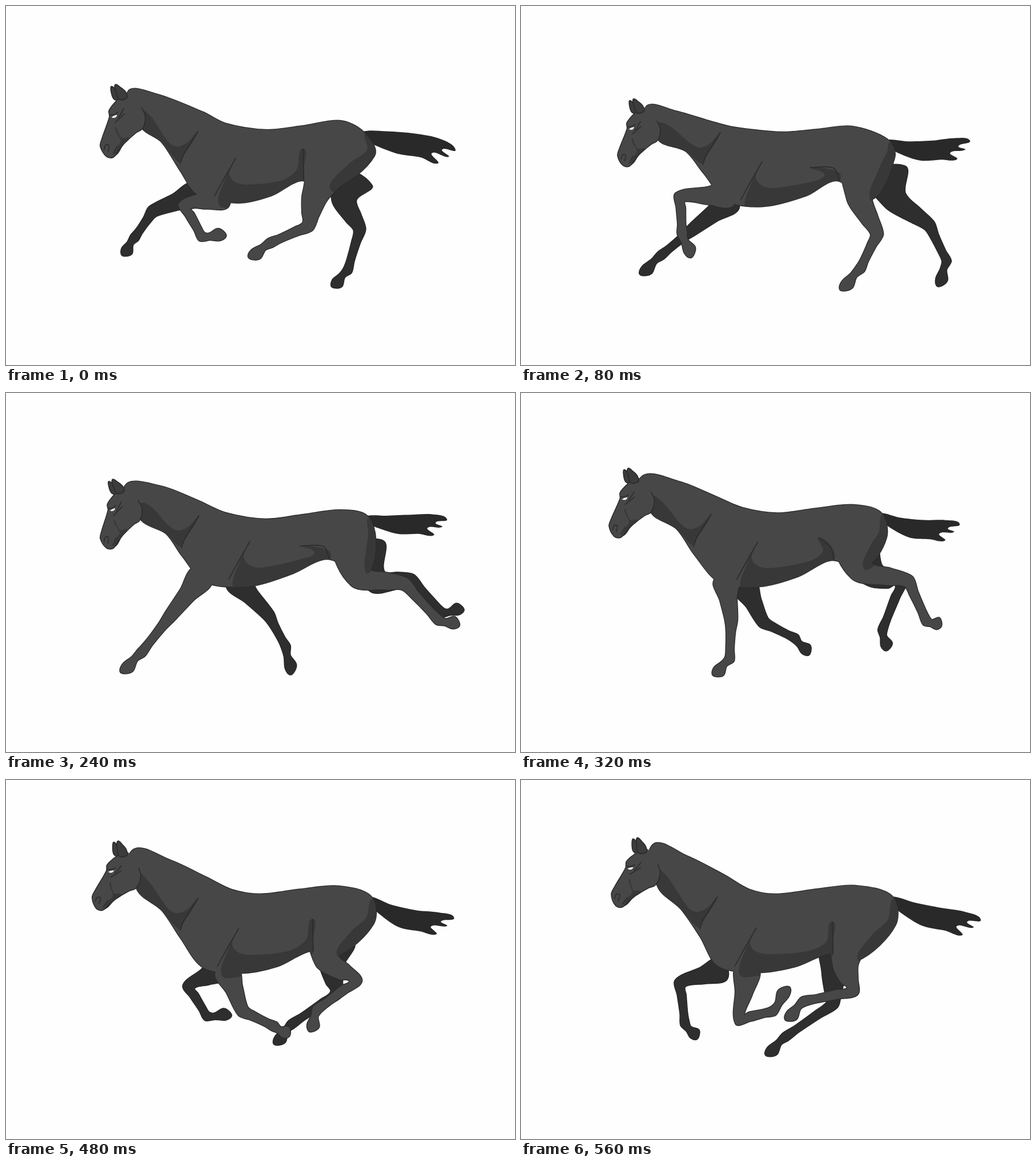
An HTML page for the animation above (640 ms loop, 891x629 px).

```html
<!DOCTYPE html>
<html lang="en">
<head>
<meta charset="utf-8">
<title>Galloping horse</title>
<style>
  html, body { margin: 0; width: 100%; height: 100%; overflow: hidden; background: #fefefe; }
  svg { display: block; width: 891px; height: 629px; }
  path { stroke-linejoin: round; stroke-linecap: round; }
  .pose { visibility: hidden; animation: show 640ms step-end infinite; }
  @keyframes show { 0% { visibility: visible; } 12.5%, 100% { visibility: hidden; } }
  .far { fill: #2e2e2e; stroke: #272727; stroke-width: 1.4; }
  .tail { fill: #292929; }
  .rim { fill: #2b2b2b; stroke: #2b2b2b; stroke-width: 2.6; }
  .coat { fill: #474747; }
  .shade { fill: #383838; }
  .line { fill: none; stroke: #2b2b2b; stroke-width: 1.6; }
  .ear { fill: #3c3c3c; stroke: #2b2b2b; stroke-width: 1.8; }
  .eye { fill: #fff; }
</style>
</head>
<body>
<svg id="stage" viewBox="0 0 891 629"></svg>
<script>
const stage = document.getElementById('stage');

const points = text => text.split(' ').map(pair => pair.split(',').map(Number));
const lerp = (a, b, t) => a.map((v, i) => v + (b[i] - v) * t);
const plus = ([x, y], dx, dy) => [x + dx, y + dy];
const unit = (a, b) => {
  const x = b[0] - a[0], y = b[1] - a[1], length = Math.hypot(x, y) || 1;
  return [x / length, y / length];
};

// Smooth path through points; tangents follow the neighbours, scaled to each segment.
function curve(p, closed = true) {
  const n = p.length;
  const at = i => closed ? p[(i + n) % n] : p[Math.max(0, Math.min(n - 1, i))];
  const tangent = i => unit(at(i - 1), at(i + 1));
  let d = `M${p[0]}`;
  for (let i = 0; i < n - (closed ? 0 : 1); i++) {
    const a = at(i), b = at(i + 1), u = tangent(i), v = tangent(i + 1);
    const k = .3 * Math.hypot(b[0] - a[0], b[1] - a[1]);
    d += `C${plus(a, u[0] * k, u[1] * k)} ${plus(b, -v[0] * k, -v[1] * k)} ${b}`;
  }
  return d;
}

function add(parent, tag, attributes) {
  const node = document.createElementNS('http://www.w3.org/2000/svg', tag);
  for (const name in attributes) node.setAttribute(name, attributes[name]);
  return parent.appendChild(node);
}

const draw = (parent, style, d) => add(parent, 'path', { class: style, d });

// Joints run from the body down to fetlock and toe; a hind leg has one joint more.
function leg(text) {
  const joints = points(text), hind = joints.length > 4;
  const toe = joints.pop(), fetlock = joints.pop(), knee = joints.pop(), top = joints[0];
  const bone = hind
    ? [[top, 34], [joints[1], 22], [lerp(joints[1], knee, .6), 15]]
    : [[top, 20], [lerp(top, knee, .5), 15]];
  bone.push([knee, 11], [lerp(knee, fetlock, .3), 8], [lerp(knee, fetlock, .75), 7], [fetlock, 8.5]);
  const front = [], back = [];
  bone.forEach(([p, width], i) => {
    const before = unit(bone[Math.max(i - 1, 0)][0], bone[Math.max(i, 1)][0]);
    const after = unit(p, i < bone.length - 1 ? bone[i + 1][0] : toe);
    const [x, y] = unit([0, 0], plus(before, ...after));
    front.push(plus(p, -y * width, x * width));
    back.unshift(plus(p, y * width, -x * width));
  });
  const [x, y] = unit(fetlock, toe);
  const hoof = (t, side) => plus(lerp(fetlock, toe, t), y * side, -x * side);
  return curve([...front, hoof(.35, -6), hoof(.75, -7), toe, hoof(.9, 9), hoof(.65, 14), hoof(.3, 6), ...back]);
}

const tailShape = points('0,-3 25,-9 55,-12 82,-10 100,0 86,1 94,8 76,6 84,16 65,12 40,12 15,8 0,4');

function tail(dock, [tipX, tipY, bend]) {
  const x = (tipX - dock[0]) / 100, y = (tipY - dock[1]) / 100;
  return curve(tailShape.map(([along, across]) => {
    const side = across + bend * along * (100 - along) / 2500;
    return plus(dock, x * along - y * side, y * along + x * side);
  }));
}

const profile = points('198,161 187,173 180,184 181,194 168,232 165,246 176,264 188,265 199,251 208,240 228,222 238,216 243,205 243,190 237,178');
const creases = ['182,191 189,190 196,186', '197,196 206,180', '191,204 200,196 207,189', '172,252 174,244 180,244 179,255', '188,259 194,246'];

function drawHead(parent, [x, y, turn, scale]) {
  const g = add(parent, 'g', { transform: `translate(${x} ${y}) rotate(${turn}) scale(${scale}) translate(-189 -193)` });
  const shape = (style, text) => draw(g, style, curve(points(text)));
  shape('ear', '185,141 184,150 189,163 198,164 194,151');
  draw(g, 'coat', curve([...profile, [222, 162], [212, 154]]));
  shape('shade', '191,213 202,231 215,231 206,242 192,262 195,247 201,236');
  draw(g, 'line', curve(profile, false));
  shape('ear', '191,138 201,143 209,150 212,160 199,164 193,152');
  shape('eye', '185,195 194,191 192,195 188,196');
  for (const crease of creases) draw(g, 'line', curve(points(crease), false));
}

// Trunk outline from poll over the back to dock, buttock, belly, chest and jaw.
// reach: 0 with the hind legs gathered, 1 with them stretched back.
const torso = (head, tip, reach, outline) => ({ head, tip, reach: [reach], trunk: points(outline) });
const between = (a, b) => ({
  head: lerp(a.head, b.head, .5),
  tip: lerp(a.tip, b.tip, .5),
  reach: lerp(a.reach, b.reach, .5),
  trunk: a.trunk.map((p, i) => lerp(p, b.trunk[i], .5))
});

const gathered = torso([189, 193, 0, 1], [787, 252, 2], 0,
  '213,151 262,154 345,186 385,206 455,217 520,210 585,201 625,220 645,262 568,322 517,306 465,332 405,345 335,330 306,290 272,238 238,214');
const stretching = torso([193, 214, 2, .93], [786, 236, 11], 1,
  '218,178 270,184 335,203 370,212 455,221 520,216 580,211 642,234 654,265 612,340 553,306 500,332 425,351 362,342 319,292 288,254 242,236');
const landing = torso([195, 213, -2, .93], [798, 231, 5], 1,
  '218,175 280,175 335,198 375,213 475,229 520,225 580,219 624,225 645,280 630,354 568,314 510,328 440,346 345,335 306,285 285,242 243,230');
const planted = torso([186, 204, -2, .95], [772, 221, 7], 1,
  '208,163 270,163 335,188 385,210 455,221 520,213 585,205 632,215 647,260 630,315 562,291 500,317 430,338 350,332 308,285 280,246 238,224');
const pushing = torso([176, 165, 11, .97], [764, 238, 17], 0,
  '212,133 285,148 345,174 390,192 445,200 510,192 580,187 628,204 632,248 570,300 525,295 470,326 405,340 345,331 298,280 265,230 220,198');
const floating = torso([191, 154, 11, .98], [805, 245, 9], 0,
  '230,114 290,133 355,166 400,192 445,200 520,191 585,185 650,204 655,255 590,316 542,304 480,327 415,337 345,326 314,275 280,226 240,188');

function drawShading(g, trunk, reach) {
  const [dock, buttock, thigh, flank, loin, girth, , chest, throat, jaw] = trunk.slice(7);
  const from = (p, text) => points(text).map(offset => plus(p, ...offset));
  const rump = lerp(buttock, thigh, .5);
  const spike = plus(flank, 3 - 50 * reach, -56 + 33 * reach);
  const peak = plus(girth, -3, -78);
  const shade = list => draw(g, 'shade', curve(list));
  const line = list => draw(g, 'line', curve(list, false));

  shade([peak, ...from(girth, '-14,-52 -6,-38 16,-32'), plus(loin, 20, -27), plus(flank, -8 - 14 * reach, -20 + 8 * reach),
    spike, plus(flank, 4, -20 + 6 * reach), plus(flank, 2, 6), plus(loin, 0, 6), ...from(girth, '0,6 -32,4 -22,-40')]);
  shade([plus(jaw, 2, -32), jaw, throat, ...from(chest, '-3,-16 5,-28 30,-70 13,-52 -5,-44 -20,-50')]);
  shade([plus(dock, 4, 5), plus(buttock, -13, -10), plus(rump, -8, -14), thigh, plus(rump, 8, 14), plus(buttock, 10, 0)]);
  line([peak, ...from(girth, '-22,-45 -40,-12')]);
  line(from(chest, '-1,-14 5,-30 30,-70'));
  line([spike, plus(flank, 4 - 10 * reach, -22), plus(flank, 4, 0)]);
}

let count = 0;

function pose({ head, tip, reach, trunk }, fore, hind, farFore, farHind) {
  const g = add(stage, 'g', { class: 'pose', style: `animation-delay:${count * 80 - 640}ms` });
  const id = `body${count++}`;
  const body = [curve(trunk), leg(fore), leg(hind)];
  for (const limb of [farFore, farHind]) draw(g, 'far', leg(limb));
  draw(g, 'tail', tail(plus(trunk[7], -2, 5), tip));
  const clip = add(g, 'clipPath', { id });
  for (const d of body) add(clip, 'path', { d });
  for (const style of ['rim', 'coat']) for (const d of body) draw(g, style, d);
  drawShading(add(g, 'g', { 'clip-path': `url(#${id})` }), trunk, reach[0]);
  drawHead(g, head);
}

pose(gathered,
  '385,332 313,350 343,404 385,404', '580,255 540,335 528,386 463,415 424,439',
  '335,328 257,360 225,406 202,436', '610,300 592,340 619,392 598,463 569,491');
pose(stretching,
  '370,330 279,335 282,398 296,441', '600,260 592,335 623,400 594,460 558,496',
  '370,338 300,392 245,437 207,469', '640,290 655,340 715,385 745,447 728,491');
pose(landing,
  '365,322 262,368 221,411 187,436', '610,270 640,340 692,375 730,450 716,490',
  '362,335 373,400 370,468 340,495', '610,260 665,325 730,358 793,407 833,411');
pose(planted,
  '345,318 288,390 237,455 200,488', '610,260 620,322 698,335 757,398 793,409',
  '400,325 460,390 490,445 497,494', '628,270 650,330 710,328 764,385 802,381');
pose(between(planted, pushing),
  '358,325 368,398 365,466 335,493', '585,250 595,310 678,330 710,400 735,410',
  '390,335 425,402 480,430 503,460', '590,280 620,320 665,333 633,415 638,452');
pose(pushing,
  '372,325 446,402 497,455 511,500', '580,250 565,300 638,325 608,402 613,445',
  '372,345 373,410 415,412 441,412', '580,290 590,322 602,352 539,400 530,446');
pose(between(pushing, floating),
  '385,330 415,405 470,432 495,450', '570,260 562,315 612,352 545,402 530,440',
  '375,330 320,362 352,414 395,414', '575,280 570,325 578,375 500,428 468,462');
pose(floating,
  '397,328 383,419 441,405 471,364', '580,250 568,325 580,370 495,388 462,419',
  '355,330 279,356 287,427 307,455', '560,290 548,340 545,393 463,450 427,481');
</script>
</body>
</html>
```
